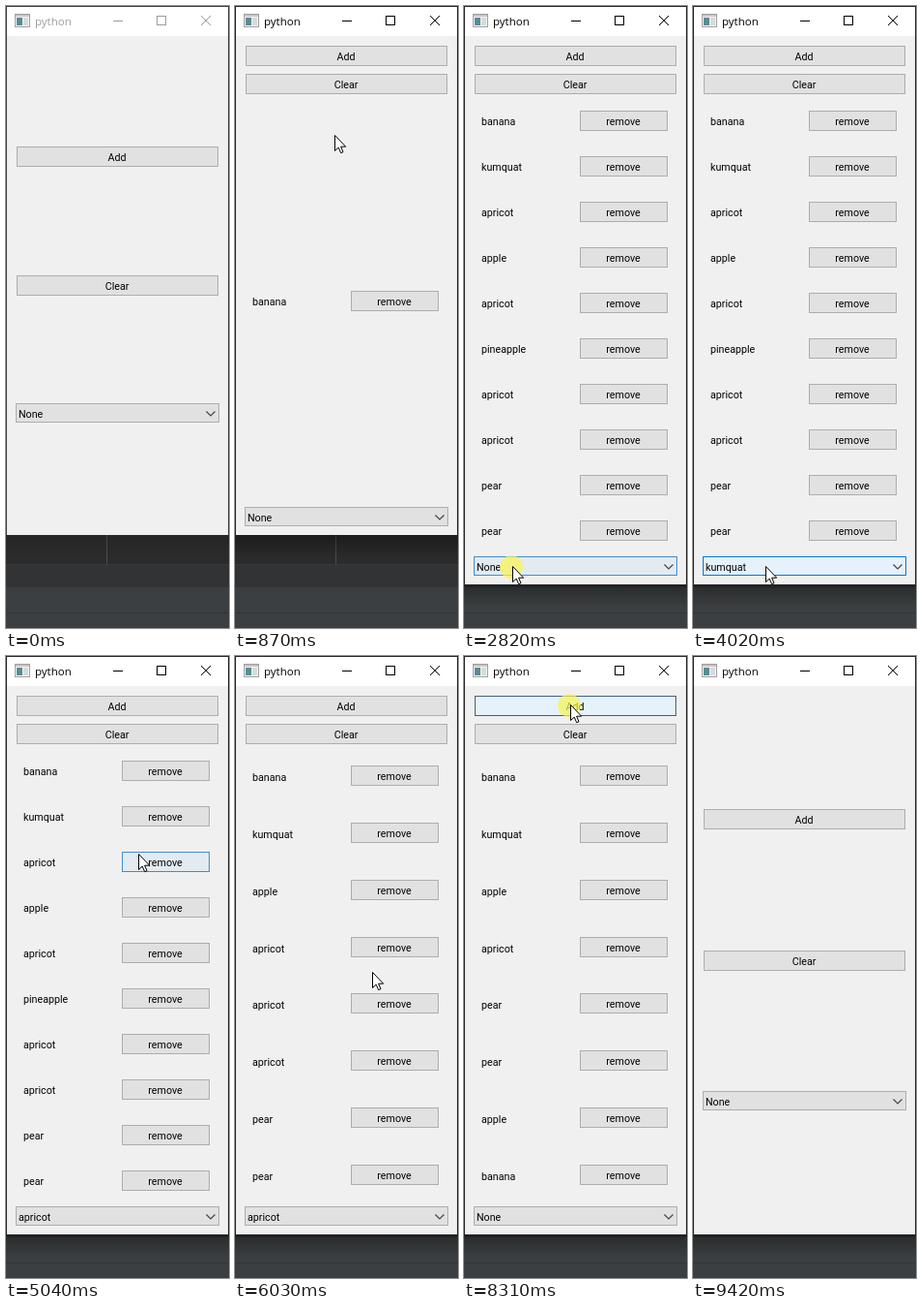
Recreate the animation shown at these times as an HTML page with a canvas. Size 231 px wide and 642 px high, loop 9.6 s.

```html
<!DOCTYPE html>
<html lang="en">
<head>
<meta charset="utf-8">
<title>python</title>
<style>
  html, body { margin: 0; width: 231px; height: 642px; overflow: hidden; background: #3c3f41; }
  canvas { display: block; width: 231px; height: 642px; }
</style>
</head>
<body>
<canvas id="stage"></canvas>
<script>
const W = 231, STAGE_H = 642, LOOP = 9600, STEP = 30;
const UI_FONT = '10.7px Roboto, sans-serif';
const TITLE_FONT = '11.5px "Open Sans", sans-serif';
const FRUIT = ['banana', 'kumquat', 'apricot', 'apple', 'apricot', 'pineapple',
               'apricot', 'apricot', 'pear', 'pear', 'apple', 'banana'];

// Mouse path: time, x, y
const PATH = [
  [180, 130, 700], [210, 128, 617], [660, 104, 156], [780, 104, 156], [1080, 99, 48],
  [2170, 99, 48], [2340, 102, 161], [2480, 102, 161], [2760, 50, 578], [2900, 50, 578],
  [3200, 72, 620], [3610, 72, 620], [3990, 75, 578], [4130, 75, 578], [4270, 76, 632],
  [4480, 76, 632], [4900, 112, 235], [5030, 137, 204], [5680, 137, 204], [5920, 142, 326],
  [6340, 142, 326], [6600, 143, 358], [6760, 143, 358], [7010, 145, 396], [7330, 145, 396],
  [7500, 155, 412], [7660, 155, 412], [8040, 110, 50], [8390, 110, 50], [8600, 112, 81],
  [9070, 112, 81], [9400, 130, 660]
];

// Clicks: time, action, argument
const CLICKS = [
  [720, 'add'],
  ...Array.from({ length: 9 }, (_, k) => [1150 + 119 * k, 'add']),
  [2850, 'open'], [3300, 'pick', 'kumquat'],
  [4110, 'open'], [4310, 'pick', 'apricot'],
  [5200, 'remove', 2], [5980, 'remove', 4], [6700, 'remove', 4],
  [7090, 'remove', 4, 'None'],
  [8150, 'add'], [8290, 'add'], [8720, 'clear']
];

const canvas = document.getElementById('stage');
const ctx = canvas.getContext('2d');
const ratio = window.devicePixelRatio || 1;
canvas.width = W * ratio;
canvas.height = STAGE_H * ratio;
ctx.scale(ratio, ratio);

const mix = (a, b, k) => `rgb(${a.map((v, i) => Math.round(v + (b[i] - v) * k))})`;

function box(x, y, w, h, color) {
  ctx.fillStyle = color;
  ctx.fillRect(x, y, w, h);
}

function frame(r, fill, border) {
  box(r.x, r.y, r.w, r.h, border);
  box(r.x + 1, r.y + 1, r.w - 2, r.h - 2, fill);
}

function text(str, x, y, color = '#000', align = 'left', font = UI_FONT) {
  ctx.font = font;
  ctx.textAlign = align;
  ctx.fillStyle = color;
  ctx.fillText(str, x, y);
}

function line(points, color, width = 1) {
  ctx.beginPath();
  points.forEach(([x, y]) => ctx.lineTo(x, y));
  ctx.strokeStyle = color;
  ctx.lineWidth = width;
  ctx.stroke();
}

function pointer(t) {
  if (t < PATH[0][0]) return { x: 130, y: 700 };
  const i = PATH.findIndex(p => p[0] > t);
  if (i < 0) return { x: 130, y: 700 };
  const [t0, x0, y0] = PATH[i - 1], [t1, x1, y1] = PATH[i];
  let k = (t - t0) / (t1 - t0);
  k = k * k * (3 - 2 * k);
  return { x: Math.round(x0 + (x1 - x0) * k), y: Math.round(y0 + (y1 - y0) * k) };
}

function stateAt(t) {
  const s = { rows: [], bottom: 546, choice: 'None', open: false, active: false };
  let made = 0;
  for (const [time, action, arg, choice] of CLICKS) {
    if (time > t) break;
    s.active = true;
    if (action === 'add') s.rows.push({ id: made, name: FRUIT[made++] });
    if (action === 'remove') s.rows.splice(arg, 1);
    if (action === 'clear') s.rows = [];
    if (action === 'open') s.open = true;
    if (action === 'pick') { s.open = false; s.choice = arg; }
    if (choice) s.choice = choice;
    s.bottom = Math.max(s.bottom, 127 + 47 * s.rows.length);
  }
  return s;
}

function layout(s) {
  const n = s.rows.length;
  const gap = Math.round(s.bottom / 2 - 8) / 2;
  const tops = n ? [41, 70, s.bottom - 29] : [1, 2, 3].map(k => Math.floor(13 + gap * k));
  const pitch = (s.bottom - 127) / n;
  return [
    { id: 'Add', x: 11, y: tops[0], w: 209, h: 21, label: 'Add' },
    { id: 'Clear', x: 11, y: tops[1], w: 209, h: 21, label: 'Clear' },
    { id: 'combo', x: 10, y: tops[2], w: 211, h: 20 },
    ...s.rows.map((row, i) => {
      const y = 84.5 + pitch * (i + 0.5);
      return { id: row.id, x: 120, y: Math.floor(y), w: 91, h: 21, label: 'remove',
               name: row.name, nameY: Math.round(y + 0.4) + 15 };
    })
  ];
}

function hovered(t) {
  const s = stateAt(t), p = pointer(t);
  if (s.open) return 'combo';
  const hit = layout(s).find(r => p.x >= r.x && p.x < r.x + r.w && p.y >= r.y && p.y < r.y + r.h);
  return hit ? hit.id : null;
}

function drawDesktop() {
  box(0, 0, W, STAGE_H, '#2b2b2b');
  box(104, 546, 1, 30, '#4d4d4d');
  box(0, 576, W, 24, '#313335');
  box(0, 576, W, 1, '#393b3d');
  box(0, 600, W, 42, '#3c3f41');
  box(0, 626, W, 1, '#323436');
}

function drawWindow(s) {
  const shade = ctx.createLinearGradient(0, s.bottom, 0, s.bottom + 24);
  shade.addColorStop(0, `rgba(0,0,0,${s.active ? 0.35 : 0.12})`);
  shade.addColorStop(1, 'rgba(0,0,0,0)');
  box(0, s.bottom, W, 24, shade);
  box(0, 0, W, s.bottom, s.active ? '#2a2a2a' : '#444');
  box(1, 1, 229, 30, '#fff');
  box(1, 31, 229, s.bottom - 31, '#f0f0f0');

  frame({ x: 9, y: 8, w: 16, h: 14 }, '#f4f4f4', '#a39c9f');
  box(10, 9, 14, 2, '#c9c3c6');
  box(11, 12, 6, 8, '#5c8c93');
  box(18, 12, 5, 8, '#d5dbdc');

  const ink = s.active ? '#000' : '#a09a9a';
  text('python', 30, 20, ink, 'left', TITLE_FONT);
  box(111, 15, 10, 1, ink);
  ctx.strokeStyle = ink;
  ctx.lineWidth = 1;
  ctx.strokeRect(156.5, 10.5, 9, 9);
  line([[202, 10], [212, 20]], ink);
  line([[212, 10], [202, 20]], ink);
}

function drawWidget(r, hot, pressed, choice) {
  const fill = mix([225, 225, 225], [229, 241, 251], hot);
  const border = pressed && r.id !== 'combo' ? '#3d6280' : mix([173, 173, 173], [0, 120, 215], hot);
  frame(r, fill, border);
  if (r.id === 'combo') {
    text(choice, 13, r.y + 15);
    line([[207.5, r.y + 8.5], [212, r.y + 13], [216.5, r.y + 8.5]], '#444', 1.2);
    return;
  }
  text(r.label, r.x + r.w / 2 - 0.5, r.y + 15, '#000', 'center');
  if (r.name) text(r.name, 18, r.nameY);
}

function drawPopup(s, p) {
  const top = s.bottom - 9, rowH = 13;
  const items = ['None', ...s.rows.map(r => r.name)];
  const h = items.length * rowH + 2;
  box(15, top + 5, 211, h, 'rgba(0,0,0,.35)');
  frame({ x: 10, y: top, w: 211, h }, '#fff', '#646464');
  const over = Math.floor((p.y - top - 1) / rowH);
  const current = over >= 0 ? over : items.indexOf(s.choice);
  items.forEach((name, i) => {
    const y = top + 1 + i * rowH;
    if (i === current) box(11, y, 209, rowH, '#0078d7');
    text(name, 13, y + 10, i === current ? '#fff' : '#000');
  });
}

function drawPointer(p, pressed) {
  if (pressed) {
    ctx.beginPath();
    ctx.arc(p.x - 1, p.y + 1, 12, 0, Math.PI * 2);
    ctx.fillStyle = 'rgba(250,243,80,.7)';
    ctx.fill();
  }
  ctx.save();
  ctx.translate(p.x + 0.5, p.y + 0.5);
  const arrow = new Path2D('M0 0V16L3.7 12.6 6.2 18.2 8.5 17.2 6.1 11.7H11.2Z');
  ctx.fillStyle = '#fff';
  ctx.fill(arrow);
  ctx.strokeStyle = '#000';
  ctx.lineWidth = 1;
  ctx.stroke(arrow);
  ctx.restore();
}

function draw(t) {
  const s = stateAt(t), p = pointer(t);
  const pressed = CLICKS.some(([c]) => t >= c - 70 && t < c + 40);
  // Hover fades over the last few steps
  const trail = [0, 1, 2, 3, 4].map(k => hovered(Math.max(0, t - k * STEP)));
  drawDesktop();
  drawWindow(s);
  for (const r of layout(s)) {
    const hot = trail.filter(id => id === r.id).length / trail.length;
    drawWidget(r, hot, pressed && trail[0] === r.id, s.choice);
  }
  if (s.open) drawPopup(s, p);
  drawPointer(p, pressed);
}

const start = performance.now();
function tick() {
  const t = (performance.now() - start) % LOOP;
  draw(Math.floor(t / STEP) * STEP);
  requestAnimationFrame(tick);
}
tick();
</script>
</body>
</html>
```
